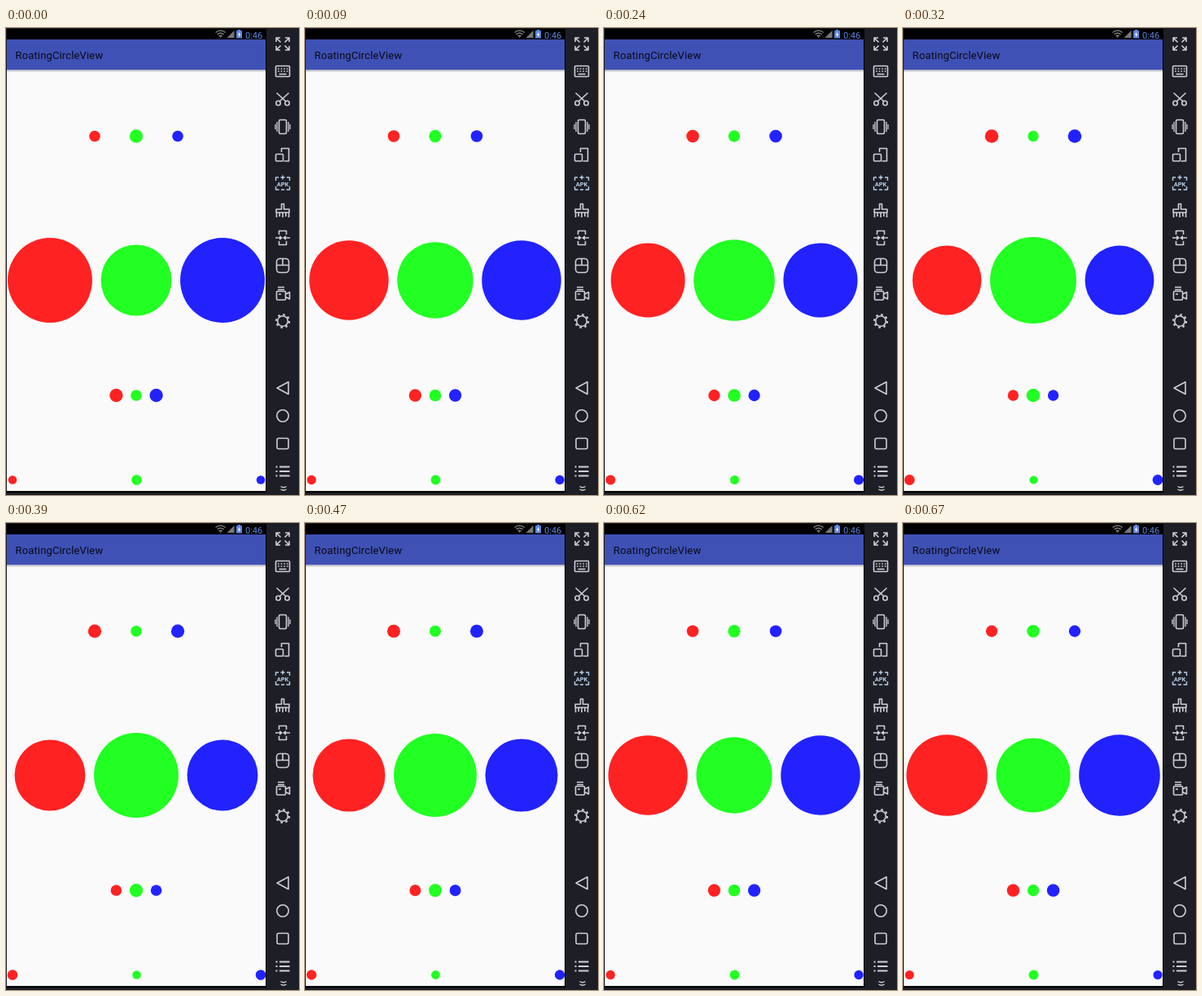
Animation of 360x572 px, one loop 0.7 s. Source, as an HTML page:

```html
<!DOCTYPE html>
<html lang="en">
<head>
<meta charset="utf-8">
<title>Pulsing circles</title>
<style>
  html, body { margin: 0; width: 100%; height: 100%; overflow: hidden; background: #1e1f26; }
  svg { display: block; width: 360px; height: 572px; }
  text { font-family: Roboto, "Noto Sans", sans-serif; }
  .icon { fill: none; stroke: #cdd0d8; stroke-width: 1.6; stroke-linejoin: round; }
  .solid { fill: #cdd0d8; stroke: none; }
</style>
</head>
<body>
<svg viewBox="0 0 360 572">
  <defs>
    <linearGradient id="shade" x2="0" y2="1">
      <stop stop-color="#b9bac0"/>
      <stop offset="1" stop-color="#fafafa"/>
    </linearGradient>
  </defs>

  <!-- device screen -->
  <rect width="360" height="572" fill="#1e1f26"/>
  <rect x="1" y="1" width="319" height="568" fill="#000"/>
  <rect x="1" y="51" width="318" height="516" fill="#fafafa"/>
  <rect x="1" y="14" width="318" height="37.5" fill="#3f51b5"/>
  <rect x="1" y="51.5" width="318" height="3" fill="url(#shade)"/>
  <text x="11.5" y="38" font-size="13" letter-spacing=".15" fill="#080a16">RoatingCircleView</text>

  <!-- status bar -->
  <g fill="none" stroke="#8d8d8d" stroke-width="1.3">
    <path d="M257.6 5.6q6-5 12 0M259.6 7.8q4-3.4 8 0M261.6 10q2-1.6 4 0"/>
    <path d="M262.4 10.3h2.4L263.6 12z" fill="#8d8d8d" stroke="none"/>
    <path d="M280.5 3v9h-9z" fill="#777" stroke="none"/>
  </g>
  <path d="M285 2h3v1.2h2V12.5h-7V3.200h2z" fill="#5c86e0"/>
  <path d="M287.300 4.500l-2.600 4h1.700l-.6 3 2.700-4h-1.700z" fill="#fff"/>
  <text x="294" y="12.500" font-size="11" fill="#5c86e0">0:46</text>

  <g id="dots"></g>

  <!-- side toolbar -->
  <g class="icon">
    <path d="M332 17v-5h5M343 12h5v5M348 22v5h-5M337 27h-5v-5M332.500 12.500l5 5M347.500 12.500l-5 5M347.500 26.500l-5-5M332.500 26.500l5-5"/>

    <rect x="331.500" y="46.500" width="17" height="13" rx="1"/>
    <path d="M334 50h12.500M334 53h12.500" stroke-dasharray="1.700 1.900"/>
    <path d="M335.500 56.500h9"/>

    <path d="M332.500 79.500l11.500 10.500M347.500 79.500l-11.500 10.500"/>
    <circle cx="334.500" cy="92" r="2.700"/>
    <circle cx="345.500" cy="92" r="2.700"/>

    <rect x="335.500" y="112.500" width="9" height="17" rx="1.500"/>
    <path d="M333 115v12M347 115v12M331 118v6M349 118v6" stroke-width="1.300"/>

    <path d="M338.500 152v-4.500h9v15.500h-6"/>
    <rect x="331.500" y="154.500" width="9" height="8.500" rx="1"/>

    <g stroke="#b9d0ea">
      <path d="M335 183h-3.500v4M345 183h3.500v4M331.500 194v4h4M348.500 194v4h-4M338 198h4M340 180.500v5M337.500 183h5" stroke-width="1.400"/>
      <text x="340" y="193.700" font-size="7.500" font-weight="700" text-anchor="middle" fill="#b9d0ea" stroke="none">APK</text>
    </g>

    <path d="M338.500 222v-6.500h3v6.500h6.500v4h-16v-4zM332.500 226v6M336.200 226v5M340 226v6M343.800 226v5M347.500 226v6"/>

    <path d="M335.500 253v-4.500h9v4.500M335.500 261v4.500h9v-4.500"/>
    <path d="M331 257h6M349 257h-6" />
    <path class="solid" d="M336 254l4 3-4 3zM344 254l-4 3 4 3z"/>

    <rect x="332.500" y="282.500" width="15" height="17" rx="4"/>
    <path d="M332.500 290.500h15M340 283v7"/>

    <path d="M334 317.500h8M334 320.500h8" stroke-width="1.300"/>
    <rect x="332.500" y="322.500" width="11" height="10.500" rx="1"/>
    <path d="M343.500 326l5-2.500v8.500l-5-2.500M335 326h3"/>

    <circle cx="340" cy="359" r="6.300"/>
    <circle cx="340" cy="359" r="8" stroke-width="2.200" stroke-dasharray="2.600 3.683"/>

    <path d="M347 433.500v15l-14-7.500z"/>
    <circle cx="340" cy="475" r="7.200"/>
    <rect x="333" y="502.500" width="14" height="13" rx="2"/>
    <path d="M331.500 537.500h2M331.500 543h2M331.500 548.500h2M336 537.500h12.500M336 543h12.500M336 548.500h12.500" stroke-width="1.800"/>
    <path d="M337.500 561.500q3.500 2.500 7 0M337.500 565q3.500 2.500 7 0" stroke-width="1.300"/>
  </g>
</svg>

<script>
const LOOP = 700;
const COLORS = ["#ff2222", "#22ff22", "#2222ff"];

// [time in ms, pulse level 0..10]
const STEPS = [
  [0, 1], [50, 3], [90, 4], [160, 5], [200, 6], [240, 7], [290, 9], [320, 10],
  [390, 9], [440, 8], [480, 7], [520, 6], [570, 5], [620, 4], [670, 3]
];

// lead: the outer circles follow the pulse, the middle one opposes it
const ROWS = [
  { y: 132.5, mid: 160, gap: 51, r: 8.3, lead: true },
  { y: 309, mid: 160, gap: 106, r: 53, lead: false },
  { y: 450, mid: 160, gap: 24.6, r: 8.3, lead: false },
  { y: 553.5, mid: 160.5, gap: 152.5, r: 6.4, lead: true }
];

const dots = document.getElementById("dots");

function addDot(row, i) {
  const dot = document.createElementNS("http://www.w3.org/2000/svg", "circle");
  const rising = (i !== 1) === row.lead;
  const radius = level => row.r * (0.8 + 0.02 * (rising ? level : 10 - level)) + "px";
  const frames = STEPS.map(([t, level]) => ({
    offset: t / LOOP, r: radius(level), easing: "step-end"
  }));
  frames.push({ offset: 1, r: radius(STEPS[0][1]) });

  dot.setAttribute("cx", row.mid + (i - 1) * row.gap);
  dot.setAttribute("cy", row.y);
  dot.setAttribute("fill", COLORS[i]);
  dots.append(dot);
  dot.animate(frames, { duration: LOOP, iterations: Infinity });
}

for (const row of ROWS) COLORS.forEach((_, i) => addDot(row, i));
</script>
</body>
</html>
```
